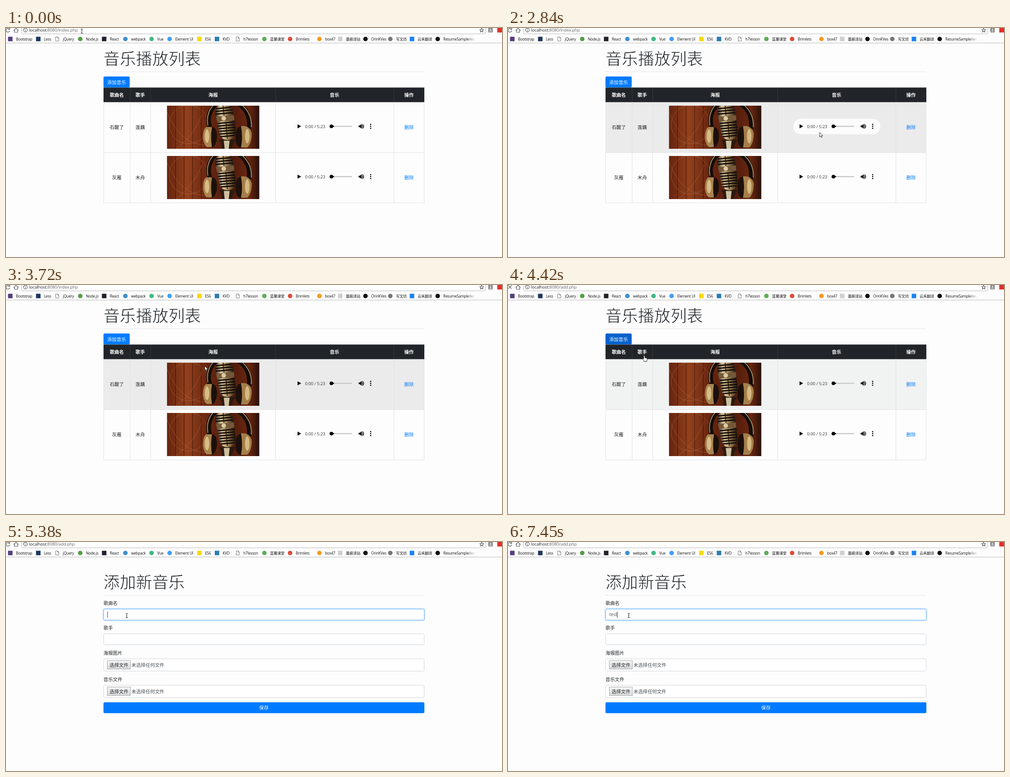
An HTML page for the animation above (7990 ms loop, 1099 px wide and 510 px high).

```html
<!DOCTYPE html>
<html lang="zh-CN">
<head>
<meta charset="utf-8">
<title>音乐播放列表</title>
<style>
html, body { margin: 0; width: 100%; height: 100%; overflow: hidden; background: #fdfdfd; }
svg { display: block; }
text { font: 10.4px "Open Sans", "Noto Sans CJK SC", "Noto Sans CJK", sans-serif; fill: #212529; white-space: pre; }
.mid { text-anchor: middle; }
.bold { font-weight: 700; }
.link { fill: #007bff; }
.h1 { font-size: 36px; font-weight: 300; stroke: #fdfdfd; stroke-width: .8px; }
.url { font-size: 9.5px; letter-spacing: -.15px; fill: #666; }
.url .host { fill: #222; }
.mark { font-size: 8.2px; letter-spacing: -.18px; fill: #111; }
.time { font-size: 9.4px; letter-spacing: -.05px; fill: #333; }
.grey { fill: #495057; }
.typed { font-size: 10px; fill: #495057; }
.white { fill: #fff; }
.field { fill: #fff; stroke: #ced4da; }
.line { stroke: #dee2e6; fill: none; }
.rule { stroke: #e6e6e6; }
.icon { fill: none; stroke: #555; stroke-width: 1.2; }
</style>
</head>
<body>
<svg width="1099" height="510" viewBox="0 0 1099 510">
  <defs>
    <linearGradient id="wood">
      <stop offset="0" stop-color="#64240f"/>
      <stop offset=".22" stop-color="#93401c"/>
      <stop offset=".42" stop-color="#6b2710"/>
      <stop offset=".7" stop-color="#4e1b0c"/>
      <stop offset=".88" stop-color="#6a2710"/>
      <stop offset="1" stop-color="#2c110a"/>
    </linearGradient>
    <linearGradient id="metal">
      <stop offset="0" stop-color="#2c1c10"/>
      <stop offset=".3" stop-color="#d8c9a2"/>
      <stop offset=".55" stop-color="#a58a5c"/>
      <stop offset="1" stop-color="#20140c"/>
    </linearGradient>
    <linearGradient id="grey" x2="0" y2="1">
      <stop offset="0" stop-color="#f7f7f7"/>
      <stop offset="1" stop-color="#d9d9d9"/>
    </linearGradient>
    <linearGradient id="fade">
      <stop offset="0" stop-color="#fdfdfd" stop-opacity="0"/>
      <stop offset="1" stop-color="#fdfdfd"/>
    </linearGradient>
    <clipPath id="frame"><rect width="205" height="96"/></clipPath>
    <clipPath id="selClip"><rect id="selArea" y="0" height="10.5"/></clipPath>

    <g id="poster" clip-path="url(#frame)">
      <rect width="205" height="96" fill="url(#wood)"/>
      <path d="M19 0V96M38 0V96M57 0V96M76 0V96M198 0V96" stroke="#2a0f08" stroke-opacity=".8"/>
      <g fill="none" stroke="#c98a58" stroke-opacity=".5" stroke-width=".8">
        <circle cx="48" cy="42" r="43"/>
        <path d="M0 14Q30 90 92 88M20 96Q60 66 78 20"/>
      </g>
      <path d="M95 48Q86 20 108 -4M158 -4Q186 12 182 52" fill="none" stroke="#140c09" stroke-width="10"/>
      <path d="M91 44Q86 18 103 -2M166 -2Q189 18 187 48" fill="none" stroke="#b39a70" stroke-width="1.8"/>
      <path d="M86 48Q106 44 109 60V84Q104 94 88 92Q80 84 80 70Q80 54 86 48Z" fill="#a98551"/>
      <path d="M100 47Q112 50 111 70T100 93Q96 70 100 47Z" fill="#1b100b"/>
      <ellipse cx="89" cy="68" rx="5" ry="15" fill="#d9bd88"/>
      <path d="M160 46Q184 42 188 62Q188 84 178 93H162Q152 70 160 46Z" fill="#a47e4a"/>
      <path d="M164 45Q152 48 152 70T164 94Q169 70 164 45Z" fill="#1b100b"/>
      <ellipse cx="178" cy="68" rx="5" ry="16" fill="#d6b981"/>
      <path d="M116 76H152L146 86L143 96H122L121 86Z" fill="#2a1a10"/>
      <path d="M126 78H139L137 96H128Z" fill="#cfc0a0"/>
      <g transform="rotate(-5 130 40)">
        <path d="M109 14Q112 -4 128 -4Q145 -4 149 14L151 58Q148 76 133 77Q118 76 115 62Z" fill="url(#metal)"/>
        <path d="M111 5H146M110 11H148M110 17H149M113 38H150M113 44H150M114 50H151M115 56H151M115 62H150M117 68H148" stroke="#180e08" stroke-width="3"/>
        <path d="M110 23H150V34H112Z" fill="#75583a"/>
        <path d="M128 -3V22M131 36V74" stroke="#1d120b" stroke-width="1.6"/>
        <circle cx="127" cy="28" r="5" fill="#dccaa0"/>
      </g>
    </g>

    <g id="audio">
      <path d="M-83 -4.5L-75 0L-83 4.5Z"/>
      <text class="time" x="-66.5" y="3.6">0:00 / 5:23</text>
      <rect x="-12" y="-1.3" width="50" height="2.6" rx="1.3" fill="#c8c8c8"/>
      <circle cx="-8" r="4"/>
      <rect x="-12" y="-1.3" width="10" height="2.6" rx="1.3"/>
      <path d="M52.5 -2H55.5L59 -5.5V5.5L55.5 2H52.5Z"/>
      <path d="M60.2 -2.6Q62.4 0 60.2 2.6M60.5 -5Q67 0 60.5 5" fill="none" stroke="#000" stroke-width="1.4"/>
      <circle cx="79" cy="-4.3" r="1.4"/><circle cx="79" r="1.4"/><circle cx="79" cy="4.3" r="1.4"/>
    </g>

    <g id="file">
      <rect class="field" x="216.5" y=".5" width="710" height="27.5" rx="3"/>
      <rect x="224.5" y="4.5" width="51" height="19" fill="url(#grey)" stroke="#a3a3a3"/>
      <text x="229.6" y="18">选择文件</text>
      <text class="grey" x="278" y="18">未选择任何文件</text>
    </g>
  </defs>

  <rect width="1099" height="510" fill="#fdfdfd"/>

  <g id="browser">
    <path id="reload" class="icon" d="M7.4 2.2A4.2 4.2 0 1 0 8.4 6M8.4 .2V3.2H5.2"/>
    <path id="stop" class="icon" d="M.8 1L8 8.4M8 1L.8 8.4"/>
    <path class="icon" d="M17 5.5L22.3 .6L27.6 5.5M18.8 4.5V9.5H25.8V4.5"/>
    <rect x="34.5" y="-12" width="1028.5" height="25" rx="3" fill="#fff" stroke="#b8b8b8"/>
    <circle class="icon" cx="43" cy="4.7" r="4.2" stroke-width="1"/>
    <path d="M43 4V7.2M43 2V3" stroke="#555" stroke-width="1.1"/>
    <text class="url" x="51" y="7.8"><tspan class="host">localhost:</tspan>8080/<tspan id="path"></tspan></text>
    <g clip-path="url(#selClip)">
      <rect x="50" width="112" height="10.5" fill="#0078d7"/>
      <text class="url white" x="51" y="7.8">localhost:8080/index.php</text>
    </g>
    <path class="icon" stroke-width="1" d="M1054 .6L1055.3 3.5L1058.3 3.8L1056 5.9L1056.7 9L1054 7.3L1051.3 9L1052 5.9L1049.7 3.8L1052.7 3.5Z"/>
    <rect x="1068.5" y="0" width="10" height="10" rx="1" fill="#8a8a8a"/>
    <path d="M1073.5 1V5.5M1071.3 3.8L1073.5 6L1075.7 3.8M1070.5 8H1076.5" fill="none" stroke="#fff"/>
    <rect x="1088.5" y="0" width="11" height="10" fill="#e5302b"/>
    <g id="marks"></g>
    <rect x="1022" y="17" width="18" height="14" fill="url(#fade)"/>
    <rect x="1040" y="17" width="50" height="14" fill="#fdfdfd"/>
    <path d="M0 33.5H1099" stroke="#b9b9b9"/>
  </g>

  <g id="list">
    <text class="h1" x="216" y="81.8">音乐播放列表</text>
    <path class="rule" d="M216 97.5H927"/>
    <rect id="add" x="216" y="108" width="58" height="24.5" rx="2.5"/>
    <text class="mid white" x="245" y="124.6">添加音乐</text>
    <rect x="216.5" y="133" width="710" height="32" fill="#212529" stroke="#32383e"/>
    <path d="M275 133V165M320.5 133V165M597.5 133V165M859.5 133V165" stroke="#32383e"/>
    <g id="rows"></g>
    <path class="line" d="M216.5 165.5V389.5H926.5V165.5M216 277.5H927M275 165.5V389M320.5 165.5V389M597.5 165.5V389M859.5 165.5V389"/>
  </g>

  <g id="form">
    <text class="h1" x="216" y="102.6">添加新音乐</text>
    <path class="rule" d="M216 118.5H927"/>
    <text x="216" y="140.4">歌曲名</text>
    <rect id="glow" x="215.4" y="148.4" width="712.2" height="26.7" rx="4" fill="none" stroke="#bfdeff" stroke-width="2.4"/>
    <rect id="name" class="field" x="216.5" y="149.5" width="710" height="24.3" rx="3"/>
    <text id="typed" class="typed" x="224.5" y="165.2"></text>
    <rect id="caret" y="155" width="1" height="13.5" fill="#333"/>
    <text x="216" y="195.4">歌手</text>
    <rect class="field" x="216.5" y="204.5" width="710" height="24.3" rx="3"/>
    <text x="216" y="250.8">海报图片</text>
    <use href="#file" y="259.5"/>
    <text x="216" y="309.6">音乐文件</text>
    <use href="#file" y="318.5"/>
    <rect x="216" y="357" width="711" height="24.3" rx="3" fill="#007bff"/>
    <text class="mid white" x="571.5" y="373.2">保存</text>
  </g>

  <g id="arrow"><path d="M.5 .5V10.4L2.8 8.3L4.4 12L6 11.3L4.4 7.8H7.4Z" fill="#fff" stroke="#222" stroke-width=".9"/></g>
  <g id="beam"><path d="M-2.2 -4.8Q0 -4.8 0 -3.8Q0 -4.8 2.2 -4.8M0 -4V4.2M-2.2 5Q0 5 0 4Q0 5 2.2 5" fill="none" stroke="#222" stroke-width="1.1"/></g>
  <g id="hand"><path d="M-1.2 8V1Q-1.2 0 0 0T1.2 1V5L5 5.8Q6.4 6.2 6.3 7.6L5.6 11V13.5H-.6V12L-3.8 8.2Q-4 6.8 -2.6 7Z" fill="#fff" stroke="#222" stroke-width=".9"/></g>
</svg>
<script>
const LOOP = 7990;
const $ = id => document.getElementById(id);
const show = (id, on) => { $(id).style.display = on ? '' : 'none'; };

// text position, label, icon colour ('' is a blank page), round icon
const bookmarks = [
  [22, 'Bootstrap', '#563d7c'], [84, 'Less', '#1d365d'], [126, 'jQuery', ''],
  [177, 'Node.js', '#539e43', 1], [230, 'React', '#20232a'], [277, 'webpack', '#3f8fd0', 1],
  [335, 'Vue', '#41b883', 1], [375, 'Element UI', '#409eff', 1], [441, 'ES6', '#f5d90a'],
  [480, 'KVD', '#2c7cb0'], [526, 'h7lesson', ''], [585, '蓝薯课堂', '#5fae57', 1],
  [642, 'Brimlets', '#dd4b39', 1], [707, 'box47', '#f39a1e', 1], [753, '墨痕译站', '#cfcfcf'],
  [809, 'OrinKVes', '#111', 1], [864, '写文坊', '#777', 1], [912, '云禾翻译', '#1a82f7'],
  [969, 'ResumeSample/we', '#111', 1]
];
$('marks').innerHTML = bookmarks.map(([x, label, color, round]) => {
  const c = x - 12.5;
  const icon = !color
    ? `<path d="M${c - 3.5} 20H${c + 1}L${c + 3.5} 22.5V29H${c - 3.5}ZM${c + 1} 20V22.5H${c + 3.5}" fill="#fff" stroke="#666" stroke-width=".9"/>`
    : round
      ? `<circle cx="${c}" cy="24.5" r="5" fill="${color}"/>`
      : `<rect x="${c - 5}" y="19.5" width="10" height="10" fill="${color}"/>`;
  return `${icon}<text class="mark" x="${x}" y="27.5">${label}</text>`;
}).join('');

const columns = [245.5, 297.5, 459, 728, 893];
const cell = (i, y, text, cls) => `<text class="mid ${cls}" x="${columns[i]}" y="${y}">${text}</text>`;
const row = (song, singer, i) => {
  const y = 165 + 112 * i;
  return `<rect id="row${i}" x="216" y="${y + .5}" width="711" height="112"/>
    <rect id="pill${i}" x="632" y="${y + 37}" width="193" height="34.5" rx="17.2" fill="#fcfcfc"/>
    ${cell(0, y + 60, song, '')}${cell(1, y + 60, singer, '')}
    <use href="#poster" x="356.5" y="${y + 8}"/><use href="#audio" x="729" y="${y + 54}"/>
    ${cell(4, y + 60, '删除', 'link')}`;
};
$('rows').innerHTML =
  ['歌曲名', '歌手', '海报', '音乐', '操作'].map((s, i) => cell(i, 152.8, s, 'bold white')).join('') +
  row('石醒了', '莲藕', 0) + row('灰雁', '木舟', 1);

// time, x, y, pointer
const moves = [
  [0, 168, 7, 'beam'], [990, 164, 6, 'beam'], [1130, 138, 6, 'beam'], [1270, 104, 5, 'beam'],
  [1410, 72, 5, 'beam'], [1560, 46, 8, 'beam'], [1710, 59.5, 69.5, 'arrow'], [1850, 84, 150, 'arrow'],
  [1980, 108, 228, 'arrow'], [2130, 125, 268, 'arrow'], [2270, 235, 268, 'arrow'],
  [2420, 400, 260, 'arrow'], [2560, 560, 250, 'arrow'], [2700, 690, 232, 'arrow'],
  [2850, 770, 218, 'arrow'], [3000, 795.5, 207.5, 'arrow'], [3150, 840, 235, 'arrow'],
  [3290, 898, 306, 'arrow'], [3430, 770, 300, 'arrow'], [3570, 620, 238, 'arrow'],
  [3720, 440, 180, 'arrow'], [3860, 310, 138, 'arrow'], [4000, 258, 122, 'hand'],
  [4150, 250, 118, 'hand'], [4420, 302, 157, 'hand'], [4580, 324, 179, 'arrow'],
  [4720, 322, 179, 'arrow'], [4860, 310, 176, 'arrow'], [5000, 290, 167, 'beam'],
  [5110, 272, 164, 'beam'], [5240, 267.5, 163.5, 'beam']
];
const keys = [[6870, 't', 228], [7040, 'te', 233], [7320, 'tes', 238], [7450, 'test', 241.5]];
const last = (list, t) => list.filter(k => k[0] <= t).pop();

function draw(t) {
  const [, x, y, pointer] = last(moves, t);
  const loading = t >= 4420 && t < 4580;
  const form = t >= 4580;
  show('list', !form);
  show('form', form);
  show('stop', loading);
  show('reload', !loading);
  $('path').textContent = t < 4420 ? 'index.php' : 'add.php';

  const selecting = t >= 1130 && t < 2130;
  const from = t < 1560 ? Math.min(160, x) : 50;
  $('selArea').setAttribute('x', from);
  $('selArea').setAttribute('width', selecting ? 160 - from : 0);

  for (const i of [0, 1]) {
    const top = 165 + 112 * i;
    const over = x > 216 && x < 927 && y > top && y < top + 112;
    $('row' + i).setAttribute('fill', over ? '#ebebeb' : loading && !i ? '#f1f2f2' : '#fdfdfd');
    show('pill' + i, over && x > 632 && x < 825 && Math.abs(y - top - 54) < 18);
  }
  $('add').setAttribute('fill', t >= 4150 ? '#0062cc' : t >= 4000 ? '#0069d9' : '#007bff');

  const focus = t >= 5240;
  const key = last(keys, t) || [0, '', 224.5];
  show('glow', focus);
  $('name').style.stroke = focus ? '#80bdff' : '';
  $('typed').textContent = key[1];
  $('caret').setAttribute('x', key[2]);
  show('caret', t >= 5380 && (t < 5780 || t >= 6310));

  for (const id of ['arrow', 'beam', 'hand']) show(id, id === pointer);
  $(pointer).setAttribute('transform', `translate(${x} ${y})`);
}

const start = performance.now();
function tick() {
  draw((performance.now() - start) % LOOP);
  requestAnimationFrame(tick);
}
tick();
</script>
</body>
</html>
```
